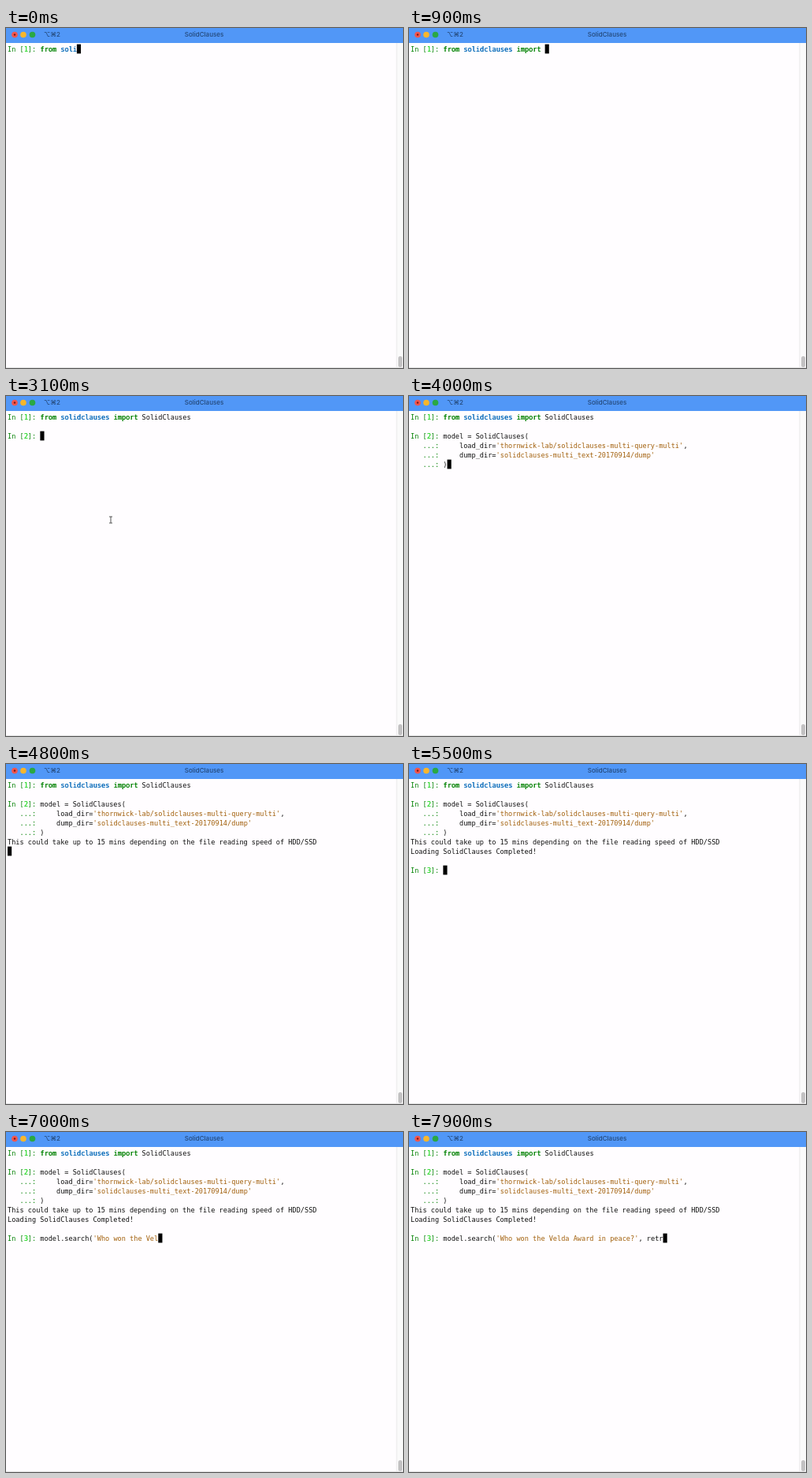
Animation of 504 by 431 pixels, one loop 8000 ms. Source, as an HTML page with a canvas:

```html
<!DOCTYPE html>
<html lang="en">
<head>
<meta charset="utf-8">
<title>Terminal</title>
<style>
  html, body { margin: 0; width: 100%; height: 100%; overflow: hidden; background: #fffdff; }
  canvas { display: block; width: 504px; height: 431px; }
</style>
</head>
<body>
<canvas id="stage"></canvas>
<script>
const W = 504, H = 431, LOOP = 8000, TICK = 100;
const LEFT = 2, TOP = 20.6, COL = 5.17, ROW = 12;
const MONO = '8.59px "DejaVu Sans Mono", monospace';
const UI = '500 8px Inter, "DejaVu Sans", sans-serif';
const INK = '#101010', GREEN = '#078407', LIME = '#35dc35', BLUE = '#0a6cba', BROWN = '#a2600c';

const canvas = document.getElementById('stage');
const ctx = canvas.getContext('2d');
const dpr = window.devicePixelRatio || 1;
canvas.width = W * dpr;
canvas.height = H * dpr;
ctx.scale(dpr, dpr);

const span = (text, color = INK, bold = false) => ({ text, color, bold });

const IMPORT = [
  span('from', GREEN, true), span(' '), span('solidclauses', BLUE, true),
  span(' '), span('import', GREEN, true), span(' SolidClauses')
];
const SEARCH = [
  span('model.search('), span("'Who won the Velda Award in peace?'", BROWN), span(', retr')
];
const CONTINUE = span('   ...: ', GREEN);
const MODEL = [
  [...prompt(2), span('model = SolidClauses(')],
  [CONTINUE, span('    load_dir='), span("'thornwick-lab/solidclauses-multi-query-multi'", BROWN), span(',')],
  [CONTINUE, span('    dump_dir='), span("'solidclauses-multi_text-20170914/dump'", BROWN)],
  [CONTINUE, span(')')]
];
const NOTICE = [span('This could take up to 15 mins depending on the file reading speed of HDD/SSD')];
const DONE = [span('Loading SolidClauses Completed!')];

// [time, characters typed]
const IMPORT_KEYS = [[0, 9], [900, 25], [1100, 29], [1200, 29], [1300, 30], [1400, 30], [1800, 37]];
const SEARCH_KEYS = [[5600, 0], [6100, 6], [6200, 6], [7900, 54]];

function prompt(n) {
  return [span('In [', GREEN), span(String(n), LIME, true), span(']: ', GREEN)];
}

function typedCount(keys, t) {
  if (t <= keys[0][0]) return keys[0][1];
  for (let i = 1; i < keys.length; i++) {
    const [t0, n0] = keys[i - 1], [t1, n1] = keys[i];
    if (t <= t1) return Math.round(n0 + (n1 - n0) * (t - t0) / (t1 - t0));
  }
  return keys[keys.length - 1][1];
}

// Keywords only take their colour once complete.
function typed(spans, count) {
  const out = [];
  for (const s of spans) {
    if (count <= 0) break;
    const text = s.text.slice(0, count);
    const partial = s.text === 'import' && text !== s.text;
    out.push(partial ? span(text) : { ...s, text });
    count -= text.length;
  }
  return out;
}

const lineLength = line => line.reduce((n, s) => n + s.text.length, 0);

// Screen lines at time t; the cursor sits at the end of the last one.
function screen(t) {
  const lines = [[...prompt(1), ...typed(IMPORT, typedCount(IMPORT_KEYS, t))]];
  if (t >= 1900) lines.push([]);
  if (t >= 3800) lines.push(...MODEL);
  else if (t >= 2600) lines.push(prompt(2));
  if (t >= 4400) lines.push(NOTICE);
  if (t >= 5000) lines.push(DONE);
  if (t >= 5100) lines.push([], [...prompt(3), ...typed(SEARCH, typedCount(SEARCH_KEYS, t))]);
  else if (t >= 4200) lines.push([]);
  return lines;
}

function box(x, y, w, h, color) {
  ctx.fillStyle = color;
  ctx.fillRect(x, y, w, h);
}

function dot(x, y, r, color) {
  ctx.fillStyle = color;
  ctx.beginPath();
  ctx.arc(x, y, r, 0, Math.PI * 2);
  ctx.fill();
}

function drawLine(line, row) {
  const y = TOP + row * ROW + 9.2;
  let col = 0;
  for (const s of line) {
    const x = LEFT + col * COL;
    ctx.fillStyle = s.color;
    ctx.fillText(s.text, x, y);
    if (s.bold) ctx.fillText(s.text, x + 0.4, y);
    col += s.text.length;
  }
}

function drawChrome() {
  box(0, 0, W, H, '#fffdff');
  box(0, 0, W, 19, '#5197f7');
  dot(11, 8.5, 3.8, '#f2564e');
  dot(11, 8.5, 1.2, '#7d1712');
  dot(22, 8.5, 3.8, '#f8b62c');
  dot(33.5, 8.5, 3.8, '#2aa844');
  ctx.font = UI;
  ctx.fillStyle = '#234777';
  ctx.textAlign = 'center';
  ctx.fillText('SolidClauses', 251.5, 11);
  ctx.textAlign = 'left';
  ctx.fillText('⌥⌘2', 48, 11);

  box(496, 19, 8, H - 19, '#fafafa');
  box(495.5, 19, 1, H - 19, '#e9e8e9');
  ctx.fillStyle = '#c2c1c2';
  ctx.beginPath();
  ctx.roundRect(498, 416, 5, 14, 2.5);
  ctx.fill();
  box(0, 430, W, 1, '#e6e5e6');
}

function drawPointer(x, y) {
  ctx.strokeStyle = '#555';
  ctx.lineWidth = 1;
  ctx.beginPath();
  ctx.moveTo(x - 2, y - 4);
  ctx.lineTo(x + 2, y - 4);
  ctx.moveTo(x, y - 4);
  ctx.lineTo(x, y + 4);
  ctx.moveTo(x - 2, y + 4);
  ctx.lineTo(x + 2, y + 4);
  ctx.stroke();
}

function draw(t) {
  drawChrome();
  const lines = screen(t);
  const last = lines.length - 1;
  ctx.font = MONO;
  lines.forEach(drawLine);
  box(LEFT + lineLength(lines[last]) * COL, TOP + last * ROW, COL, 11.8, '#000');
  if (t >= 2200 && t < 3800) drawPointer(133, 157);
}

const start = performance.now();
function frame() {
  const t = (performance.now() - start) % LOOP;
  draw(Math.floor(t / TICK) * TICK);
  requestAnimationFrame(frame);
}
frame();
</script>
</body>
</html>
```
